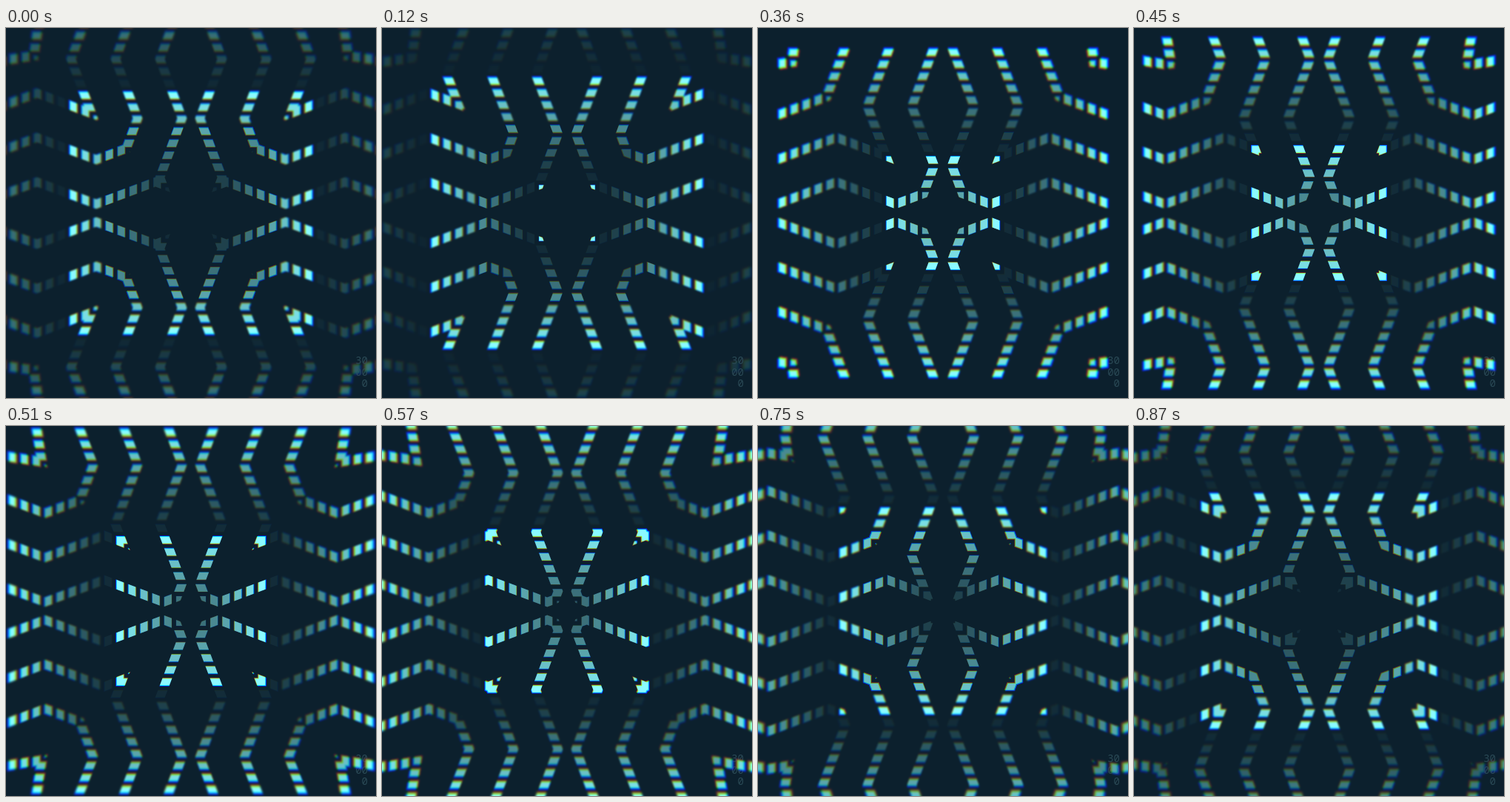
Animation of 500x500 px, one loop 900 ms. Source, as an HTML page with a canvas:

```html
<!DOCTYPE html>
<html lang="en">
<head>
<meta charset="utf-8">
<title>Dashed zigzag tunnel</title>
<style>
  html, body { margin: 0; width: 100%; height: 100%; overflow: hidden; background: #0c202d; }
  canvas { position: absolute; left: 0; top: 0; width: 500px; height: 500px; }
  pre {
    position: absolute; left: 429px; top: 441px; width: 60px; margin: 0;
    font: 14px/15.5px "Noto Sans Mono", "DejaVu Sans Mono", monospace;
    text-align: right; color: #2a4955; mix-blend-mode: lighten;
  }
</style>
</head>
<body>
<canvas id="stage" width="500" height="500"></canvas>
<pre>30
00
0</pre>
<script>
const ctx = document.getElementById("stage").getContext("2d");
const LOOP = 900, STEP = 30;
const PITCH = 16.16, DASHES = 9, DEPTH = 10.2;  // rings of dashes, moving outward
const WAVE = 160, GAP = 60, HALF = 6.5;         // zigzag lines, moving inward

// Colour added per channel, each scaled slightly apart for the lens fringe.
const CHANNELS = [
  { rgb: [128, 0, 0], zoom: 0.992 },
  { rgb: [0, 218, 0], zoom: 1 },
  { rgb: [0, 0, 210], zoom: 1.009 }
];

// The eight mirror images of one octant.
const MIRRORS = [];
for (const sx of [1, -1])
  for (const sy of [1, -1])
    MIRRORS.push((u, r) => [sx * u, sy * r], (u, r) => [sx * r, sy * u]);

const mod = (a, n) => ((a % n) + n) % n;
const clamp = (a) => Math.max(0, Math.min(1, a));

// Sideways offset of line k at distance r from the centre.
function lineAt(k, r, shift) {
  const p = mod(r - shift, WAVE) / WAVE;
  const tri = 1 - 2 * Math.abs(2 * p - 1);
  const amp = k === 3 ? 6 : 15;
  return 27 + GAP * k + amp * tri;
}

// Outline of one dash in the octant, cut off at the diagonal.
function dash(k, r0, shift) {
  const near = [], far = [];
  for (let i = 0; i <= 22; i++) {
    const r = r0 + DEPTH * (i / 22 - 0.5);
    const c = lineAt(k, r, shift);
    if (c - HALF >= r) continue;
    near.push([c - HALF, r]);
    far.unshift([Math.min(c + HALF, r), r]);
  }
  return near.length > 1 ? near.concat(far) : null;
}

function ringPath(r, shift) {
  const path = new Path2D();
  for (let k = 0; k < 5; k++) {
    const shape = dash(k, r, shift);
    if (!shape) continue;
    for (const mirror of MIRRORS) {
      shape.forEach(([u, v], i) => {
        const [x, y] = mirror(u, v);
        if (i) path.lineTo(x, y); else path.moveTo(x, y);
      });
      path.closePath();
    }
  }
  return path;
}

// Dashes dim towards the tail; a whole band dims once it has left the stage.
function glow(j, front) {
  const tail = Math.pow(1 - j / 8.8, 1.2);
  return tail * clamp((348 - front) / 60);
}

function draw(t) {
  const phase = t / LOOP;
  const lead = 158.8 + PITCH * DASHES * phase;
  const shift = 128 - WAVE * phase;

  ctx.setTransform(1, 0, 0, 1, 0, 0);
  ctx.globalCompositeOperation = "source-over";
  ctx.filter = "none";
  ctx.globalAlpha = 1;
  ctx.fillStyle = "#0c202d";
  ctx.fillRect(0, 0, 500, 500);
  ctx.globalCompositeOperation = "lighter";

  for (let i = -DASHES; i < 2 * DASHES; i++) {
    const r = lead - PITCH * i;
    if (r < 6 || r > 262) continue;
    const j = mod(i, DASHES);
    const path = ringPath(r, shift);
    ctx.globalAlpha = glow(j, r + PITCH * j);
    ctx.filter = `blur(${(0.3 + r / 230).toFixed(2)}px)`;
    for (const { rgb, zoom } of CHANNELS) {
      ctx.setTransform(zoom, 0, 0, zoom, 250, 250);
      ctx.fillStyle = `rgb(${rgb})`;
      ctx.fill(path);
    }
  }
}

let last = -1;
function tick() {
  const t = Math.floor((performance.now() % LOOP) / STEP) * STEP;
  if (t !== last) draw(last = t);
  requestAnimationFrame(tick);
}
tick();
</script>
</body>
</html>
```
